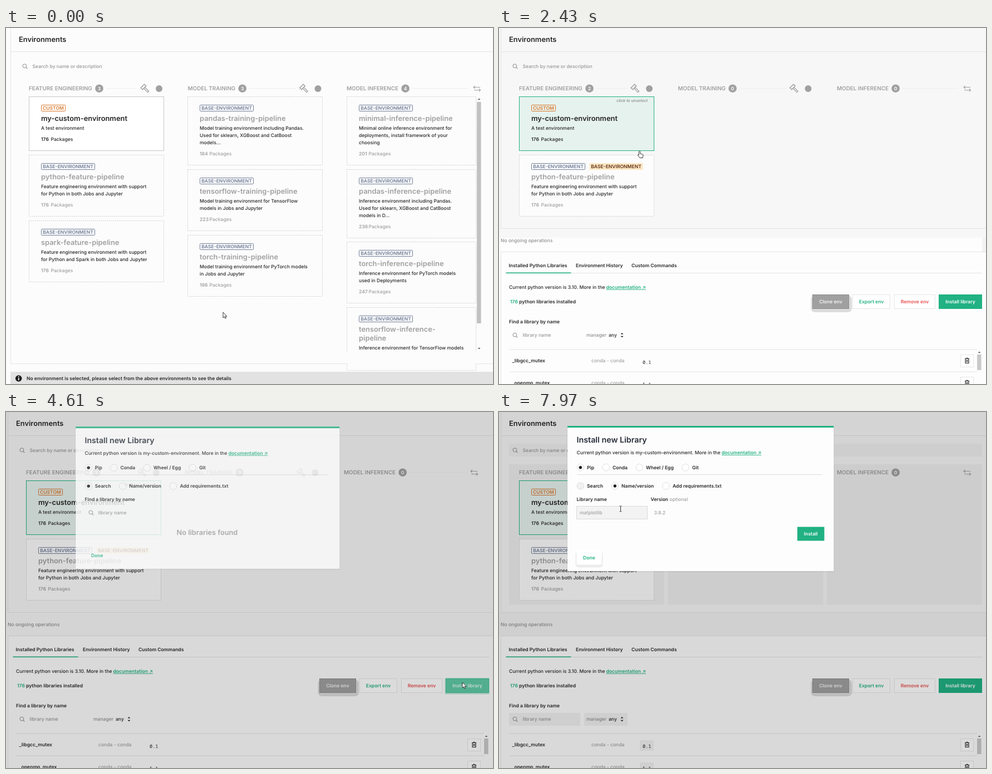
An HTML page that plays this animation: 875 by 640 pixels, repeating every 8 s.

```html
<!DOCTYPE html>
<html lang="en">
<head>
<meta charset="utf-8">
<title>Environments</title>
<style>
html, body { margin: 0; width: 100%; height: 100%; overflow: hidden; background: #fcfcfc; }
svg { display: block; width: 875px; height: 640px; }
text { font-family: Inter, sans-serif; text-rendering: geometricPrecision; white-space: pre; }
.mono { font-family: "Noto Sans Mono", monospace; }
.link { text-decoration: underline; }
.it { font-style: italic; }
</style>
</head>
<body>
<svg id="stage" viewBox="0 0 875 640"></svg>
<script>
const GREEN = '#21b182', GRAY = '#a0a0a0', DARK = '#272727', SLATE = '#717e98', RED = '#ea4e4e';
const SIZE = 8.57, BIG = 12.86;

// y is the middle of the capitals
const text = (x, y, s, fill = DARK, weight = 500, size = SIZE, extra = '') =>
  `<text x="${x}" y="${y + size * .364}" fill="${fill}" font-weight="${weight}" font-size="${size}" ${extra}>${s}</text>`;
const bold = (x, y, s, fill, size) => text(x, y, s, fill, 600, size);
const mid = (x, y, s, fill) => text(x, y, s, fill, 600, SIZE, 'text-anchor="middle"');
const rect = (x, y, w, h, fill = 'none', extra = '') =>
  `<rect x="${x}" y="${y}" width="${w}" height="${h}" fill="${fill}" ${extra}/>`;
const box = (x, y, w, h, fill, edge, extra = '') =>
  rect(x + .5, y + .5, w - 1, h - 1, fill, `stroke="${edge}" ${extra}`);
const hline = (x1, x2, y, color = '#e4e4e4') => rect(x1, y, x2 - x1, 1, color);
const path = (d, fill, extra = '') => `<path d="${d}" fill="${fill}" ${extra}/>`;
const stroke = (d, color, w = 1) => path(d, 'none', `stroke="${color}" stroke-width="${w}"`);
const disc = (x, y, r, fill, extra = '') => `<circle cx="${x}" cy="${y}" r="${r}" fill="${fill}" ${extra}/>`;
const group = (id, body) => `<g id="${id}">${body}</g>`;
const at = (x, y, body) => `<g transform="translate(${x} ${y})">${body}</g>`;
const tri = (x, y, dir, w = 2.3, color = '#555') => path(`M${x - w} ${y + dir}h${2 * w}l${-w} ${-2.4 * dir}z`, color);
const lens = (x, y) => disc(x - .6, y - .6, 3.4, 'none', 'stroke="#8a8a8a"') +
  stroke(`M${x + 1.9} ${y + 1.9}l2.4 2.4`, '#8a8a8a', 1.1);
const docLink = (x, y) => text(x, y, 'documentation ↗', GREEN, 600, SIZE, 'class="link"');

const hammer = x => at(x, 109, '<g transform="rotate(-45)">' +
  rect(-4.5, -6.5, 9, 4.4, 'none', `stroke="${GRAY}" stroke-width="1.5"`) +
  rect(-1.4, -2, 2.8, 10, 'none', `stroke="${GRAY}" stroke-width="1.3"`) + '</g>');
const swap = x => at(x, 109, stroke('M6 -2.5H-6m2.6 -2.6l-2.6 2.6 2.6 2.6M-5 2.8H6.5m-2.6 -2.6l2.6 2.6 -2.6 2.6', GRAY, 1.1));

function heads(counts) {
  const cols = [[41, 'FEATURE ENGINEERING', 167.5, 235], [326.5, 'MODEL TRAINING', 424.7, 521], [612, 'MODEL INFERENCE', 717.6, 830]];
  return cols.map(([x, name, cx, end], i) =>
    bold(x, 108.6, name, GRAY, 9.87) + disc(cx, 108.7, 7.3, GRAY) + mid(cx, 108.7, counts[i], '#fff') +
    hline(cx + 12, end, 108, '#eeeeee') +
    (i < 2 ? hammer(x + 209) + disc(x + 234, 109, 6, GRAY) : swap(846))).join('');
}

const badge = (x, y, s, w, color) => box(x, y, w, 12, 'none', color, 'rx="1"') + mid(x + w / 2, y + 6, s, color);

const looks = {
  base: ['#fcfcfc', '#cfcfcf', 'stroke-dasharray="2 1.6"'],
  custom: ['#fff', '#c8c8c8'],
  picked: ['#e6f2ee', GREEN]
};

function card(x, y, w, titles, desc, count, kind = 'base') {
  const own = kind != 'base', ink = own ? DARK : GRAY;
  const shift = 16 * (titles.length - 1), last = 56.8 + shift + 12.85 * (desc.length - 1);
  return box(x, y, w, Math.round(last + 41.3), ...looks[kind]) +
    at(x + 22, y,
      (own ? badge(0, 15, 'CUSTOM', 44, '#d9782d') : badge(0, 15, 'BASE-ENVIRONMENT', 97, SLATE)) +
      titles.map((s, i) => bold(0, 39.2 + 16 * i, s, ink, BIG)).join('') +
      desc.map((s, i) => text(0, 56.8 + shift + 12.85 * i, s)).join('') +
      (count ? bold(0, last + 20, count, ink) + text(17.5, last + 20, 'Packages', ink) : ''));
}

const pythonCard = card(41, 228, 243, ['python-feature-pipeline'],
  ['Feature engineering environment with support', 'for Python in both Jobs and Jupyter'], 176);
const myCard = kind => card(41, 123, 243, ['my-custom-environment'], ['A test environment'], 176, kind);
const header = (counts, bottom) => bold(23, 20.8, 'Environments', DARK, BIG) + hline(8, 885, 42) +
  rect(8, 0, 1, bottom, '#e4e4e4') + hline(8, 885, bottom) + lens(34, 68.8) +
  text(47.5, 68.8, 'Search by name or description', '#969696') + heads(counts);

const overview = group('overview', rect(0, 0, 875, 640, '#fcfcfc') + header([3, 3, 4], 603) + myCard('custom') + pythonCard +
  card(41, 346, 243, ['spark-feature-pipeline'], ['Feature engineering environment with support', 'for Python and Spark in both Jobs and Jupyter'], 176) +
  card(326, 123, 243, ['pandas-training-pipeline'], ['Model training environment including Pandas.', 'Used for sklearn, XGBoost and CatBoost', 'models...'], 184) +
  card(326, 254, 243, ['tensorflow-training-pipeline'], ['Model training environment for TensorFlow', 'models in Jobs and Jupyter'], 223) +
  card(326, 372, 243, ['torch-training-pipeline'], ['Model training environment for PyTorch models', 'in Jobs and Jupyter'], 196) +
  card(612, 123, 233, ['minimal-inference-pipeline'], ['Minimal online inference environment for', 'deployments, install framework of your', 'choosing'], 201) +
  card(612, 254, 233, ['pandas-inference-pipeline'], ['Inference environment including Pandas.', 'Used for sklearn, XGBoost and CatBoost', 'models in D...'], 236) +
  card(612, 384, 233, ['torch-inference-pipeline'], ['Inference environment for PyTorch models', 'used in Deployments'], 247) +
  card(612, 502, 233, ['tensorflow-inference-', 'pipeline'], ['Inference environment for TensorFlow models'], 0) +
  rect(600, 581, 246, 22, '#fcfcfc') +
  rect(846, 133, 7.5, 398, '#c1c1c1') + tri(850, 128, 1) + tri(850, 576, -1) +
  rect(8, 618, 867, 22, '#e2e2e2') + disc(22.7, 630, 5.8, '#1c1c1c') + rect(21.9, 629, 1.7, 4.3, '#fff') + disc(22.7, 627, 1, '#fff') +
  bold(37, 630, 'No environment is selected, please select from the above environments to see the details'));

const picked = group('picked', rect(0, 0, 875, 640, '#f7f7f7') +
  group('fills', [18, 303.5, 589].map(x => rect(x, 94, 279, 252.5, '#eeeeee')).join('') +
    rect(18, 57, 850, 23, '#f0f0f0') + rect(0, 361, 875, 41, '#f2f2f2')) +
  at(-5, 0, header([2, 0, 0], 360) + myCard('picked') +
    text(216, 130.8, 'click to unselect', '#949494', 600, 7.14, 'class="it"') +
    pythonCard + rect(167.5, 243, 96, 12, '#fde7c6') + mid(215.5, 249, 'BASE-ENVIRONMENT', '#5f3214')));

const row = (y, name, version) => bold(23.5, y, name) + text(166, y, 'conda - conda', GRAY) +
  text(258, y + 2.5, version, DARK, 400, SIZE, 'class="mono"') +
  box(829, y - 11, 24, 23, '#fff', '#e6e6e6') +
  at(841, y, stroke('M-4 -3.5h8M-1.5 -4.8h3M-3 -3.5v8h6v-8M-1 -1.5v4M1 -1.5v4', '#222', 1.1));
const button = (x, w, s, ink, fill = '#fff', edge = '#e6e6e6') =>
  box(x, 479, w, 26, fill, edge) + mid(x + w / 2, 492, s, ink);

const details = group('details',
  group('strip', rect(0, 377, 868, 25, '#fdfdfd') + rect(868, 377, 7, 25, '#f3f3f3')) +
  text(3, 381.5, 'No ongoing operations', '#8f8f8f') +
  rect(0, 402, 875, 238, '#fdfdfd') + hline(3, 875, 402) + rect(3, 402, 1, 238, '#e4e4e4') +
  bold(17.5, 426.5, 'Installed Python Libraries') + bold(138, 426.5, 'Environment History') + bold(238, 426.5, 'Custom Commands') +
  hline(130, 868, 440) + rect(12.5, 439.5, 117, 1.6, GREEN) +
  text(18, 465.8, 'Current python version is 3.10. More in the') + docLink(192.5, 465.8) +
  bold(20, 492, '176', GREEN) + bold(36, 492, 'python libraries installed') +
  rect(560.5, 481, 73.5, 30, '#dcdcdc', 'rx="7"') + button(563, 66, 'Clone env', '#f4f4f4', GRAY, '#8e8e8e') +
  button(635, 68, 'Export env', GREEN) + button(710, 74, 'Remove env', RED) +
  group('glow', rect(788.5, 478, 80, 29.5, '#bfe6d8', 'rx="2"')) + button(790, 78, 'Install library', '#fff', GREEN, GREEN) +
  group('lit', button(790, 78, 'Install library', '#eafaf4', '#5fcaa6', '#45bf96')) +
  bold(18, 528.3, 'Find a library by name') +
  group('fields', rect(18, 541, 128, 23, '#f1f1f1') + rect(153, 541, 78, 23, '#f1f1f1') +
    [590, 630].map(y => rect(253, y, 25, 19, '#f1f1f1', 'rx="2"')).join('')) +
  lens(29, 552.3) + text(42.5, 552.3, 'library name', '#969696') +
  text(157, 552, 'manager', '#8f8f8f') + text(197, 552, 'any') + tri(221, 549.5, 1, 2.5, '#222') + tri(221, 554.8, -1, 2.5, '#222') +
  hline(18, 859, 577.5) + row(598, '_libgcc_mutex', '0.1') + hline(18, 859, 617.5) + row(638, '_openmp_mutex', '5.1') +
  rect(859, 587, 7.5, 28, '#c9c9c9') + tri(863, 583, 1));

const radio = (x, y, s, tx, on, fill = '#fff') => disc(x, y, 6.3, fill, 'stroke="#dedede"') +
  (on ? disc(x, y, 2.7, '#1c1c1c') : '') + bold(tx, y, s);
const choice = named => radio(146.3, 133, 'Search', 158, !named, named ? '#f1f1f1' : '#fff') +
  radio(208.3, 133, 'Name/version', 220, named) + radio(300, 133, 'Add requirements.txt', 312, false);
const sheet = h => rect(122, 27, 481, h, '#000', 'opacity=".05"') + rect(123, 25, 478.5, h, '#fdfdfd') + rect(123, 25, 478.5, 3, GREEN);

const modal = group('modal',
  group('search', sheet(258) + choice(false) + bold(139.5, 157, 'Find a library by name') +
    group('focus', box(139, 169, 445, 24, '#f3f3f3', '#e0e0e0')) +
    lens(151, 181.3) + text(164, 181.3, 'library name', '#969696') +
    text(306, 216.5, 'No libraries found', GRAY, 600, BIG) + bold(151, 259.3, 'Done', GREEN)) +
  group('byName', sheet(261) + choice(true) + bold(139.5, 157, 'Library name') + bold(272.5, 157, 'Version') +
    text(306.5, 157, 'optional', GRAY) +
    group('nameHover', box(139, 169, 128, 24, '#f3f3f3', '#dadada')) +
    text(145, 181.2, 'matplotlib', GRAY) + text(278.5, 181.2, '3.8.2', GRAY) +
    rect(536, 206.5, 48.5, 25, GREEN) + mid(560.2, 219.3, 'Install', '#fff') +
    rect(137.5, 250, 49, 29.5, '#ececec', 'rx="6"') + rect(139.5, 248.5, 45, 26, '#fff') + bold(151, 261.5, 'Done', GREEN)) +
  bold(139.5, 50, 'Install new Library', '#272c38', 14.29) +
  text(139.5, 73, 'Current python version is my-custom-environment. More in the') + docLink(400, 73) +
  radio(146.3, 99.7, 'Pip', 158, true) + radio(192.3, 99.7, 'Conda', 204, false) +
  radio(252.3, 99.7, 'Wheel / Egg', 264, false) + radio(335, 99.7, 'Git', 347, false) + hline(140, 580, 112, '#dcdcdc'));

const solid = d => path(d, '#fff', 'stroke="#222" stroke-width=".9"');
const cursor = group('cursor',
  group('arrow', solid('M0 0v10l2.3-2.1 1.6 3.4 1.6-.8-1.6-3.2h3z')) +
  group('hand', solid('M-1.2 1q1.2-2 2.4 0v4l4 1q1.5.4 1.2 2l-.8 4.5h-5.2l-3.6-5q.1-1.8 2 0z')) +
  group('beam', stroke('M-2-5h1.4l.6.6.6-.6h1.4M0-4.4v8.8M-2 5h1.4l.6-.6.6.6h1.4', '#222', .9)));

const el = id => document.getElementById(id);
const show = (id, on) => el(id).style.display = on ? '' : 'none';

el('stage').innerHTML = overview + picked + details +
  group('shade', rect(0, 0, 875, 640, '#000', 'opacity=".14"')) + modal + cursor;

// time of first stop, time of last stop, pointer, stops
const moves = [
  [0, 0, 'arrow', [[390, 511]]],
  [500, 630, 'arrow', [[370, 473], [326, 396]]],
  [770, 1030, 'hand', [[276, 302], [240, 232], [225.5, 201.5]]],
  [2430, 2430, 'hand', [[252.5, 221]]],
  [2570, 3410, 'arrow', [[304, 240], [350, 278], [403, 314], [444, 338], [481, 372], [545, 404], [636, 437]]],
  [3550, 3946, 'arrow', [[662, 446], [696, 456], [735, 468], [775, 478]]],
  [4080, 4210, 'hand', [[806, 484], [820.5, 486.5]]],
  [4610, 4610, 'arrow', [[820, 486]]],
  [5040, 5870, 'arrow', [[750, 452], [690, 418], [630, 384], [555, 329], [440, 262], [310, 218], [205, 186]]],
  [6010, 6140, 'beam', [[152, 177], [160, 175]]],
  [6280, 6720, 'arrow', [[172, 162], [186, 150], [203, 140], [218, 134]]],
  [6860, 7140, 'hand', [[225, 130], [230, 129], [232, 129]]],
  [7830, 7830, 'arrow', [[226, 150]]],
  [7970, 7970, 'beam', [[218.5, 174]]]
];

function draw(t) {
  const within = (a, b) => t >= a && t < b;
  show('overview', t < 1620);
  show('picked', t >= 1620);
  show('details', t >= 1890);
  show('strip', t < 4610);
  show('fills', t >= 4760);
  show('fields', t >= 4760);
  show('lit', within(4080, 5040));
  show('glow', within(4480, 5040));
  show('shade', t >= 4610);
  show('modal', t >= 4610);
  show('search', t < 7690);
  show('focus', within(6010, 6280));
  show('byName', t >= 7690);
  show('nameHover', t >= 7970);

  const opening = t < 4760;
  el('modal').setAttribute('opacity', opening ? .8 : 1);
  el('modal').setAttribute('transform', opening ? 'translate(362 154) scale(.991) translate(-362 -154)' : '');

  const [start, end, kind, stops] = moves.filter(m => m[0] <= t).pop();
  const gap = (end - start) / (stops.length - 1) || 1;
  const [x, y] = stops[Math.min(stops.length - 1, Math.floor((t - start) / gap + .01))];
  el('cursor').setAttribute('transform', `translate(${x} ${y})`);
  for (const k of ['arrow', 'hand', 'beam']) show(k, k == kind);
}

const begin = performance.now();
function tick() {
  draw((performance.now() - begin) % 8000);
  requestAnimationFrame(tick);
}
tick();
</script>
</body>
</html>
```
